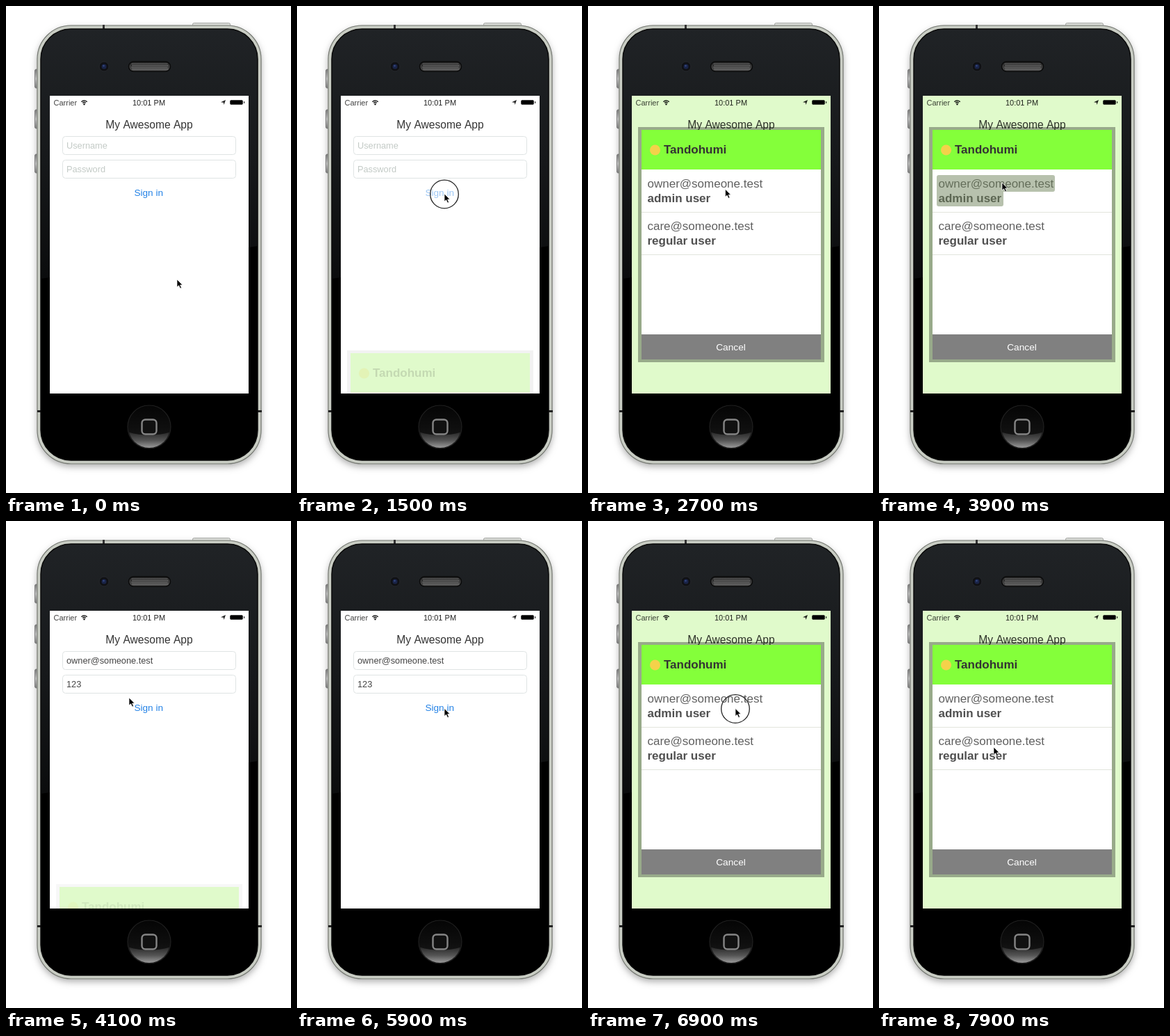
Recreate the animation shown at these times as an HTML page with a canvas. Size 410x700 px, loop 8000 ms.

```html
<!DOCTYPE html>
<html lang="en">
<head>
<meta charset="utf-8">
<title>Sign in demo</title>
<style>
  html, body { margin: 0; width: 100%; height: 100%; overflow: hidden; background: #fff; }
  canvas { display: block; }
</style>
</head>
<body>
<canvas id="stage" width="410" height="700"></canvas>
<script>
const ctx = document.getElementById('stage').getContext('2d');
const LOOP = 8000;
const FONT = '"Liberation Sans", Arial, sans-serif';
const SCREEN = { x: 63, y: 129, w: 286, h: 428 };
const ACCOUNTS = [['owner@someone.test', 'admin user'], ['care@someone.test', 'regular user']];

// Pointer stops: time, x, y
const POINTER = [
  [0, 246, 393], [900, 212, 270], [2300, 212, 270], [3200, 177, 254], [4150, 177, 254],
  [4950, 239, 362], [5750, 212, 269.5], [7250, 212, 269.5], [7900, 165, 325], [8000, 163, 328]
];
// Touches: time pressed, time released
const TOUCHES = [[900, 1900], [3550, 3750], [6000, 7000]];

const clamp = v => Math.max(0, Math.min(1, v));
const ramp = (t, from, to) => clamp((t - from) / (to - from));
const ease = u => (1 - Math.cos(Math.PI * u)) / 2;

function gradient(y0, y1, ...colors) {
  const g = ctx.createLinearGradient(0, y0, 0, y1);
  colors.forEach((c, i) => g.addColorStop(i / (colors.length - 1), c));
  return g;
}

function box(x, y, w, h, r, fill, stroke, width = 1) {
  ctx.beginPath();
  ctx.roundRect(x, y, w, h, r);
  if (fill) { ctx.fillStyle = fill; ctx.fill(); }
  if (stroke) { ctx.strokeStyle = stroke; ctx.lineWidth = width; ctx.stroke(); }
}

function disc(x, y, r, fill, stroke, width = 1) {
  box(x - r, y - r, 2 * r, 2 * r, r, fill, stroke, width);
}

function polygon(points, fill) {
  ctx.beginPath();
  points.forEach(([x, y]) => ctx.lineTo(x, y));
  ctx.closePath();
  ctx.fillStyle = fill;
  ctx.fill();
}

function text(str, x, y, size, color, align = 'left', weight = '') {
  ctx.font = `${weight} ${size}px ${FONT}`;
  ctx.textAlign = align;
  ctx.fillStyle = color;
  ctx.fillText(str, x, y);
}

function withAlpha(alpha, draw) {
  ctx.save();
  ctx.globalAlpha = alpha;
  draw();
  ctx.restore();
}

function drawPhone() {
  // Side and power buttons
  box(268.5, 24.5, 54, 6, 2, '#e4e6e2', '#a5a7a3');
  [91, 149, 213].forEach(y => box(41.5, y, 6, 27, 2, gradient(y, y + 27, '#888', '#ddd', '#888'), '#888'));

  // Metal band
  ctx.save();
  ctx.shadowColor = 'rgba(0,0,0,.3)';
  ctx.shadowBlur = 10;
  ctx.shadowOffsetY = 4;
  box(44.5, 27.5, 323, 631, 49, '#c9cdc4');
  ctx.restore();
  box(45, 28, 322, 630, 48.5, '#c9cdc4', '#777a74', 1.2);
  box(139, 27, 3, 6, 0, '#333');
  [45, 362].forEach(x => box(x, 581, 6, 3, 0, '#222'));

  // Glass with a slanted sheen
  ctx.save();
  box(50, 33, 312, 620, 43.5, '#000');
  ctx.clip();
  polygon([[50, 33], [362, 33], [362, 345], [50, 392]], gradient(33, 392, '#202326', '#17191b', '#0b0c0d'));
  ctx.restore();
  box(50, 33, 312, 620, 43.5, null, '#0a0a0a', 1.5);

  // Camera and speaker
  disc(141, 87, 7, '#101114', '#26282c');
  disc(141, 87, 3.5, '#1a2448');
  disc(140.5, 86, 1.3, '#33477f');
  box(176.5, 80, 60, 14, 7, gradient(80, 94, '#222', '#555'), '#0a0a0a', 1.5);
  for (let row = 0; row < 4; row++)
    for (let x = 181 + row % 2; x < 233; x += 2)
      box(x, 82.5 + row * 2.5, 1, 1.2, 0, '#8a8a8a');

  // Home button
  disc(206, 605, 31, gradient(574, 636, '#050505', '#0e0e0e', '#1b1b1b'), '#202020', 1.2);
  ctx.save();
  disc(206, 605, 30);
  ctx.clip();
  ctx.beginPath();
  ctx.moveTo(174, 612);
  ctx.quadraticCurveTo(206, 622, 238, 612);
  ctx.lineTo(238, 640);
  ctx.lineTo(174, 640);
  ctx.fillStyle = gradient(613, 636, '#2a2a2a', '#555', '#a0a0a0');
  ctx.fill();
  ctx.restore();
  box(195.5, 594.5, 21, 21, 5, '#111', '#858585', 2.4);
}

function drawStatusBar() {
  text('Carrier', 68.5, 142.5, 11, '#444');
  text('10:01 PM', 205.5, 142.5, 11, '#222', 'center');
  ctx.strokeStyle = '#222';
  ctx.lineWidth = 1.4;
  [3, 5.5].forEach(r => {
    ctx.beginPath();
    ctx.arc(112.5, 141.5, r, -Math.PI * .77, -Math.PI * .23);
    ctx.stroke();
  });
  disc(112.5, 141.2, 1.2, '#222');
  polygon([[316, 135], [313.5, 142], [312.8, 138.8], [309, 138.2]], '#222');
  box(322.5, 135.5, 18, 6, 1.5, '#000', '#444');
  box(342, 137, 1.3, 3, 1, '#333');
}

function drawForm(filled, pressed) {
  text('My Awesome App', 143.3, 176, 15.6, '#333');
  const values = filled ? [ACCOUNTS[0][0], '123'] : ['Username', 'Password'];
  values.forEach((value, i) => {
    const y = 187.5 + i * 34;
    box(81.5, y, 249, 26, 4, '#fff', '#dfe4e4');
    text(value, 87, y + 17.5, 12.75, filled ? '#444' : '#c3cac6');
  });
  withAlpha(1 - .55 * pressed, () => text('Sign in', 205.2, 273, 13.6, '#2583e6', 'center'));
}

function drawDialog(offset, alpha, highlighted) {
  ctx.save();
  ctx.translate(0, offset);
  ctx.globalAlpha = alpha;
  ctx.beginPath();
  ctx.rect(72, 174, 268, 338);
  ctx.rect(77, 178, 258, 330);
  ctx.fillStyle = 'rgba(0,0,0,.32)';
  ctx.fill('evenodd');

  const headerColor = alpha > .9 ? '#84ff3a' : alpha > .35 ? '#d2e8b9' : '#e0facb';
  withAlpha(1, () => {
    box(77, 178, 258, 330, 0, '#fff');
    box(77, 178, 258, 57, 0, headerColor);
  });
  disc(96.5, 207, 7.5, '#f4d24a');
  text('Tandohumi', 109, 212, 17, '#333', 'left', 'bold');

  ACCOUNTS.forEach(([email, role], i) => {
    const y = 236 + i * 61;
    text(email, 85.5, y + 24.5, 17, '#606060');
    text(role, 85.5, y + 45.5, 17, '#505050', 'left', 'bold');
    box(77, y + 60, 258, 1, 0, '#e2e4dd');
  });
  if (highlighted) {
    const tint = 'rgba(105,125,85,.48)';
    box(83, 243, 170, 24, [3, 3, 3, 0], tint);
    box(83, 267, 96, 21, [0, 0, 3, 3], tint);
  }
  box(77, 472, 258, 36, 0, '#808080');
  text('Cancel', 205.5, 495, 13.7, '#fff', 'center');
  ctx.restore();
}

function pointerAt(t) {
  const i = POINTER.findIndex(stop => stop[0] > t);
  const [t0, x0, y0] = POINTER[i - 1];
  const [t1, x1, y1] = POINTER[i];
  const k = ease(ramp(t, t0, t1));
  return [x0 + (x1 - x0) * k, y0 + (y1 - y0) * k];
}

function drawPointer(x, y, pressed) {
  withAlpha(pressed, () => disc(x, y + .5, 20.3, null, '#222', 1.3));
  ctx.save();
  ctx.translate(x, y);
  polygon([[0, 0], [0, 11], [2.6, 8.7], [4.6, 13], [6.5, 12.2], [4.6, 8], [8, 8]], '#000');
  ctx.strokeStyle = '#fff';
  ctx.lineWidth = .7;
  ctx.stroke();
  ctx.restore();
}

function render(t) {
  const pressed = Math.max(...TOUCHES.map(([down, up]) =>
    ramp(t, down, down + 200) * (1 - ramp(t, up, up + 100))));
  const opening = t < 5000 ? ramp(t, 1422, 1722) : ramp(t, 6550, 6850);
  const closing = t < 5000 ? ramp(t, 3900, 4150) : 0;
  const shown = ease(opening) * (1 - ease(closing));
  const offset = Math.round(383 * (1 - shown));

  ctx.clearRect(0, 0, 410, 700);
  drawPhone();

  ctx.save();
  ctx.beginPath();
  ctx.rect(SCREEN.x, SCREEN.y, SCREEN.w, SCREEN.h);
  ctx.clip();
  box(SCREEN.x, SCREEN.y, SCREEN.w, SCREEN.h, 0, '#fff');
  drawForm(t >= 3900, t > 3400 && t < 5000 ? 0 : pressed);
  drawStatusBar();
  ctx.globalCompositeOperation = 'multiply';
  withAlpha(clamp((shown - .25) / .75), () => box(SCREEN.x, SCREEN.y, SCREEN.w, SCREEN.h, 0, '#e0facb'));
  ctx.globalCompositeOperation = 'source-over';
  if (shown > 0) drawDialog(offset, shown, t >= 3650 && t < 3980);
  ctx.restore();

  drawPointer(...pointerAt(t), pressed);
}

const start = performance.now();
function tick() {
  render((performance.now() - start) % LOOP);
  requestAnimationFrame(tick);
}
tick();
</script>
</body>
</html>
```
